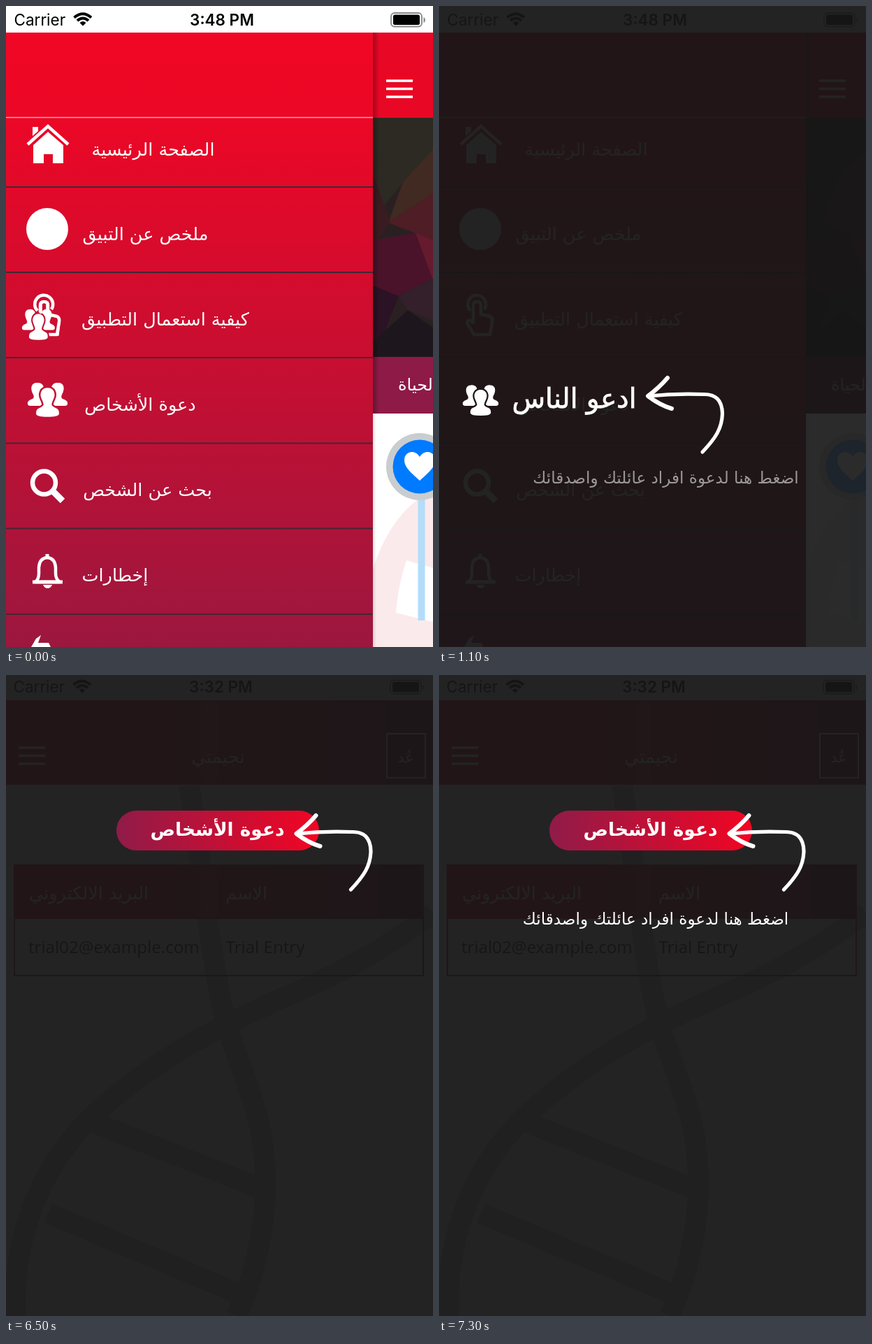
Recreate the animation shown at these times as an HTML page. Size 611 by 917 pixels, loop 8 s.

```html
<!DOCTYPE html>
<html lang="ar">
<head>
<meta charset="utf-8">
<title>Invite walkthrough</title>
<style>
html, body { margin: 0; width: 100%; height: 100%; overflow: hidden; background: #fff; }
svg { display: block; width: 611px; height: 917px; }
text { font-family: "DejaVu Sans", sans-serif; text-anchor: middle; }
.menu text { font-size: 25.5px; fill: #fff; }
.status { font: 22.5px Inter, sans-serif; }
.time { font-weight: 600; }
.cell text { font: 24.2px "Open Sans", sans-serif; text-anchor: start; fill: #111; }
.left { text-anchor: start; }
.line { fill: none; stroke: #fff; }
.title { font-size: 39px; fill: #fff; stroke: #fff; stroke-width: .8; }
.hint { font-size: 23.1px; fill: #fff; }
</style>
</head>
<body>
<svg viewBox="0 0 611 917">
<defs>
  <linearGradient id="menuFill" x2="0" y2="1">
    <stop stop-color="#f00725"/><stop offset=".14" stop-color="#ec0726"/><stop offset="1" stop-color="#9c173f"/>
  </linearGradient>
  <linearGradient id="headFill"><stop offset=".3" stop-color="#ee0726"/><stop offset="1" stop-color="#8c1a48"/></linearGradient>
  <linearGradient id="pillFill"><stop stop-color="#901b49"/><stop offset="1" stop-color="#f20523"/></linearGradient>
  <linearGradient id="edge"><stop stop-color="#000" stop-opacity=".3"/><stop offset="1" stop-color="#000" stop-opacity="0"/></linearGradient>
  <g id="people" fill="#fff" stroke="currentColor" stroke-width="2.5">
    <path id="side" stroke="none" d="M13 1C21 0 25 6 22 14Q20 18 20 21L25 25V34H4Q-1 34 0 29Q1 26 7 24Q10 22 8 18C3 9 5 1 13 1Z"/>
    <use href="#side" transform="matrix(-1 0 0 1 57 0)"/>
    <path d="M28.500 7C39 7 42 17 38 25Q36 29 35.500 32Q36 34 41 36Q47 38 46 46Q45 51 28.500 51Q12 51 11 46Q10 38 16 36Q21 34 21.500 32Q21 29 19 25C15 17 18 7 28.500 7Z"/>
  </g>
  <g id="icons">
    <g fill="none" stroke="#000" stroke-width="4">
      <path d="M97.500 16.500Q110 6 122 16.500M102 21Q110 14 118 21"/>
      <path d="M105.500 24Q110 20 114.500 24L110 28.500Z" fill="#000" stroke="none"/>
      <rect x="551" y="10" width="44" height="19.500" rx="5" stroke="#888" stroke-width="1.800"/>
    </g>
    <rect x="554" y="12.500" width="38" height="14.500" rx="2.500"/>
    <path d="M597.500 16Q600 17 600 20T597.500 24Z" fill="#888"/>
    <text class="status left" x="11.500" y="27.500">Carrier</text>
  </g>
  <path id="burger" class="line" stroke-width="3.600" d="M544 107H582M544 118.500H582M544 130H582"/>
  <g id="arrow" class="line" stroke-linecap="round" stroke-linejoin="round">
    <path stroke-width="5.200" d="M377 638C396 618 405 604 405.500 583C405 564 396 555 378 555.500Q338 554 300 558"/>
    <path stroke-width="6" d="M327 532Q315 546 299 558Q316 571 333 576"/>
  </g>
  <text id="hint" class="hint" x="324.500" y="683">اضغط هنا لدعوة افراد عائلتك واصدقائك</text>
</defs>

<g id="sceneA">
  <rect width="611" height="917" fill="#fff"/>
  <use href="#icons"/>
  <text class="status time" x="309" y="27.500">3:48 PM</text>

  <rect x="525" y="38" width="86" height="122" fill="#e90726"/>
  <use href="#burger"/>
  <rect x="525" y="160" width="86" height="343" fill="#2a2021"/>
  <path d="M525 160H611V215L570 250L525 305Z" fill="#2c2a23"/>
  <path d="M611 205V268L547 310L568 252Z" fill="#402a22"/>
  <path d="M525 240L550 308L525 345Z" fill="#381c22"/>
  <path d="M525 335L586 325L611 390L560 415L525 400Z" fill="#4a1329"/>
  <path d="M547 310L611 268V345L586 325Z" fill="#4f1d25"/>
  <path d="M586 325L611 335V392Z" fill="#661a2d"/>
  <path d="M525 400L562 415L540 470L525 480Z" fill="#2c1225"/>
  <path d="M562 415L611 390V450L575 435Z" fill="#33202a"/>
  <path d="M525 480L575 435L611 460V503H525Z" fill="#1d171d"/>
  <rect x="525" y="502" width="86" height="81" fill="#8e1a47"/>
  <text class="left" x="561" y="550" font-size="24" fill="#fff">الحياة</text>
  <path d="M611 692Q552 722 525 805V917H611Z" fill="#fbeaec"/>
  <path d="M573 793L611 804V881L558 868Q561 828 573 793Z" fill="#fff"/>
  <rect x="589.500" y="700" width="10" height="179" fill="#b2ddf8"/>
  <circle cx="592" cy="659" r="48" fill="#c9cdd0"/>
  <circle cx="592" cy="659" r="38.500" fill="#007aff"/>
  <path d="M592 679C580 668 570 660 570 650C570 636 586 634 592 645C598 634 614 636 614 650C614 660 604 668 592 679Z" fill="#fff"/>
  <rect x="525" y="38" width="9" height="545" fill="url(#edge)"/>
  <rect x="525" y="583" width="5" height="334" fill="url(#edge)" opacity=".4"/>

  <g class="menu">
    <rect y="38" width="525" height="879" fill="url(#menuFill)"/>
    <path d="M0 159.500H525" stroke="#f6a5ad" stroke-width="1.300"/>
    <path d="M0 259H525M0 381H525M0 503H525M0 625.500H525M0 747.500H525M0 870H525" stroke="#442733" stroke-width="1.800"/>
    <text x="210.500" y="214">الصفحة الرئيسية</text>
    <text x="199.500" y="335">ملخص عن التبيق</text>
    <text x="228" y="457">كيفية استعمال التطبيق</text>
    <text x="192" y="579">دعوة الأشخاص</text>
    <text x="202.500" y="701">بحث عن الشخص</text>
    <text x="156" y="823">إخطارات</text>

    <path d="M39 199L60 180L82 199V225H67V212H54V225H39Z" fill="#fff"/>
    <path d="M31 198L60 172L89 198" class="line" stroke-width="4.500"/>
    <path d="M38 173H46V179L38 186Z" fill="#fff"/>
    <circle cx="59" cy="319" r="30" fill="#fff"/>
    <g class="line" stroke-width="4.500" stroke-linejoin="round">
      <path d="M45 436A13 13 0 1 1 65 434"/>
      <path d="M49 454V428Q49 423 54.500 423T60 428V441L73 444Q77 446 76 452L73 470H50L41 455Q39 449 45 450L49 454"/>
    </g>
    <g id="crowd" color="#c21034">
      <use href="#people" transform="translate(23 433) scale(.82 .9)"/>
      <use href="#people" transform="translate(31 538)"/>
      <path d="M50 440V428Q50 423 54.500 423T59 428V441L73 444Q77 446 76 452L74 470H66" class="line" stroke-width="3.500"/>
    </g>
    <circle cx="54.500" cy="682" r="16.500" class="line" stroke-width="6.500"/>
    <path d="M67 694L81 708" class="line" stroke-width="9"/>
    <path d="M42 824Q47 820 47 812V803Q48 790 59 789Q70 790 71 803V812Q71 820 77 824Z" class="line" stroke-width="4.500" stroke-linejoin="round"/>
    <path d="M38 824H81M59 784V789" class="line" stroke-width="5"/>
    <path d="M53 828H66Q64 833 59.500 833T53 828Z" fill="#fff"/>
    <path d="M36 917L43 905L50 900L46 911H61L64 917Z" fill="#fff"/>
  </g>
</g>

<g id="sceneB">
  <rect width="611" height="917" fill="#fff"/>
  <g fill="none" stroke="#cfcfcf" stroke-width="30">
    <path d="M262 157C285 300 293 430 322 520C350 600 374 650 371 740C369 800 355 860 330 917"/>
    <path d="M14 917C8 790 60 690 130 625C220 545 300 505 400 460Q520 410 611 340"/>
    <path d="M125 640L365 735M60 770L345 890"/>
  </g>
  <g transform="translate(-1 -2.500)">
    <use href="#icons"/>
    <text class="status time" x="308.500" y="27.500">3:32 PM</text>
  </g>
  <rect y="36" width="611" height="121" fill="url(#headFill)"/>
  <use href="#burger" x="-526" y="-3"/>
  <text x="303.500" y="126" font-size="26" fill="#fff">نجيمتي</text>
  <rect x="545" y="84" width="55" height="63" class="line" stroke-width="2"/>
  <text x="572" y="125" font-size="21" fill="#fff">عُد</text>
  <rect x="11" y="271" width="587" height="78" fill="url(#headFill)"/>
  <path d="M12 348V430H597V348" fill="none" stroke="#a01642" stroke-width="2"/>
  <text x="118.500" y="321" font-size="25.500" fill="#fff">البريد الالكتروني</text>
  <text x="344" y="321" font-size="25.500" fill="#fff">الاسم</text>
  <g class="cell"><text x="32" y="398">trial02@example.com</text><text x="314.500" y="398">Trial Entry</text></g>
</g>

<rect id="shade" width="611" height="917" fill="#171717" fill-opacity=".945"/>

<g id="tipA">
  <rect x="525" y="583" width="86" height="334" fill="#fff" opacity=".035"/>
  <use href="#people" color="#1e1417" transform="translate(34 541.500) scale(.895)"/>
  <text class="title" x="193.500" y="575">ادعو الناس</text>
  <use href="#arrow"/>
  <use id="hintA" href="#hint"/>
</g>

<g id="tipB">
  <rect x="158" y="194" width="290" height="57" rx="28.500" fill="url(#pillFill)"/>
  <text x="302.500" y="230" font-size="26.400" font-weight="bold" fill="#fff">دعوة الأشخاص</text>
  <use href="#arrow" x="116.500" y="-331"/>
  <use id="hintB" href="#hint" x="-14.500" y="-326"/>
</g>
</svg>
<script>
const LOOP = 8000, TIP_A = 600, TIP_B = 6500, STEP = 100;
const el = id => document.getElementById(id);
const show = (id, on) => { el(id).style.display = on ? '' : 'none'; };
// Opacity rises in even steps of 100 ms
const fade = (t, start, steps) => Math.max(0, Math.min(1, Math.floor((t - start) / STEP) / steps));

function draw() {
  const t = performance.now() % LOOP;
  const dark = t >= TIP_A, second = t >= TIP_B;
  show('sceneA', !second);
  show('sceneB', second);
  show('crowd', !dark);
  show('shade', dark);
  show('tipA', dark && !second);
  show('tipB', second);
  el('hintA').setAttribute('opacity', fade(t, TIP_A, 9));
  el('hintB').setAttribute('opacity', fade(t, TIP_B, 8));
  requestAnimationFrame(draw);
}
draw();
</script>
</body>
</html>
```
